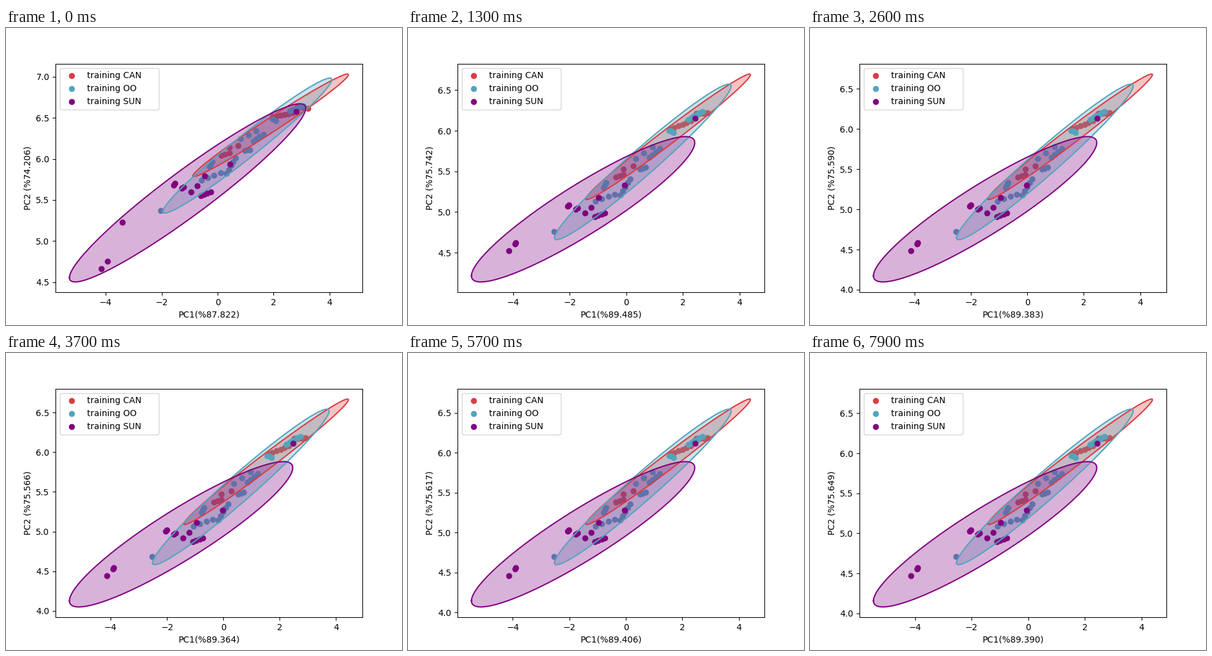
A matplotlib script that plays this animation: 640 by 480 pixels, repeating every 8000 ms.

```python
import numpy as np
import matplotlib.pyplot as plt
from matplotlib.animation import FuncAnimation

FRAMES, STEP = 80, 100
SETTLE = 1300

# time, PC1 %, PC2 %, lift, slide, sag
KEYS = np.array([
    (0, 87.822, 74.206, 1, 0, 0),
    (SETTLE, 89.485, 75.742, 0, 0, 0),
    (2600, 89.383, 75.590, 0, .045, .039),
    (4600, 89.349, 75.547, 0, .050, .116),
    (5700, 89.406, 75.617, 0, .025, .063),
    (6900, 89.399, 75.626, 0, .025, .056),
    (7900, 89.390, 75.649, 0, .005, .055),
])

# Ellipses: centre x, y, half width, half height, correlation (start, settled).
# Strands of evenly spaced samples: x, y at both ends and count.
GROUPS = {
    "CAN": dict(
        color="#db3c41",
        start=(1.895, 6.410, 2.779, .624, .987),
        end=(1.480, 5.926, 2.907, .772, .989),
        strands=[(-.37, 5.43, -.10, 5.46, 3), (-.10, 5.53, .24, 5.57, 2),
                 (1.55, 6.02, 2.28, 6.12, 6), (2.47, 6.21, 2.87, 6.22, 4)]),
    "OO": dict(
        color="#53a4bd",
        start=(1.061, 6.163, 3.017, .822, .977),
        end=(.584, 5.617, 3.121, .957, .975),
        strands=[(-2.55, 4.76, -2.55, 4.76, 1), (-1.09, 5.13, -.41, 5.22, 4),
                 (-.80, 5.30, -.72, 5.36, 3), (-.21, 5.21, .14, 5.41, 5),
                 (.48, 5.53, .68, 5.55, 3), (.33, 5.66, .92, 5.80, 3),
                 (.81, 5.67, 1.18, 5.78, 4), (1.51, 6.00, 1.67, 5.98, 3),
                 (2.19, 6.14, 2.69, 6.24, 6)]),
    "SUN": dict(
        color="purple",
        start=(-1.072, 5.587, 4.221, 1.085, .951),
        end=(-1.526, 5.034, 3.945, .894, .9155),
        strands=[(-4.15, 4.52, -4.15, 4.52, 1), (-3.93, 4.61, -3.91, 4.62, 2),
                 (-2.07, 5.07, -2.03, 5.09, 2), (-1.79, 5.03, -1.72, 5.05, 2),
                 (-1.46, 4.99, -1.24, 5.06, 2), (-1.11, 4.94, -.76, 4.99, 4),
                 (-.98, 5.18, -.06, 5.33, 2), (2.43, 6.15, 2.43, 6.15, 1)]),
}


def samples(strands):
    return np.vstack([np.linspace(s[:2], s[2:4], s[4]) for s in strands]).T


def ellipse(cx, cy, w, h, rho):
    t = np.linspace(np.pi, 3 * np.pi, 200)
    return np.array([cx + w * np.cos(t), cy + h * np.cos(t - np.arccos(rho))])


def raised(points, lift):
    """Early pose: all but the lowest samples sit further up and right."""
    x, y = points
    free = lift * (y > 4.615)
    right = np.maximum(x, 0)
    return np.array([x + free * (.51 - .055 * right),
                     y + free * (.61 - .075 * right) + (lift - free) * .14])


def drifted(points, slide, sag):
    x, y = points
    return np.array([x + slide * (x + 7) / 10,
                     y - sag * (1 - .29 * (y - 4.5))])


def limits(values, margin=.05):
    lo, hi = values.min(), values.max()
    pad = margin * (hi - lo)
    return lo - pad, hi + pad


def state(ms):
    if ms < SETTLE:
        ms = SETTLE * (1 - (1 - ms / SETTLE) ** 2)
    return [np.interp(ms, KEYS[:, 0], col) for col in KEYS.T[1:]]


fig, ax = plt.subplots(figsize=(6.4, 4.8), dpi=100)
ax.set_autoscale_on(False)

for name, g in GROUPS.items():
    color = g["color"]
    g["points"] = samples(g["strands"])
    g["line"], = ax.plot([], [], color=color)
    g["area"], = ax.fill([0, 1, 1], [0, 0, 1], color=color, alpha=.3, lw=0)
    g["dots"] = ax.scatter([0], [0], color=color,
                           label=f"training {name}" + " " * 5)
ax.legend(loc="upper left")


def draw(n):
    pc1, pc2, lift, slide, sag = state(n * STEP)
    curves = []
    for g in GROUPS.values():
        shape = lift * np.array(g["start"]) + (1 - lift) * np.array(g["end"])
        curve = drifted(ellipse(*shape), slide, sag)
        g["line"].set_data(*curve)
        g["area"].set_xy(curve.T)
        g["dots"].set_offsets(drifted(raised(g["points"], lift), slide, sag).T)
        curves.append(curve)
    xs, ys = np.hstack(curves)
    ax.set_xlim(limits(xs))
    ax.set_ylim(limits(ys))
    ax.set_xlabel(f"PC1(%{pc1:.3f})")
    ax.set_ylabel(f"PC2 (%{pc2:.3f})")
    return []


anim = FuncAnimation(fig, draw, frames=FRAMES, interval=STEP,
                     init_func=lambda: draw(0), repeat=True, repeat_delay=0)
plt.show()
```
